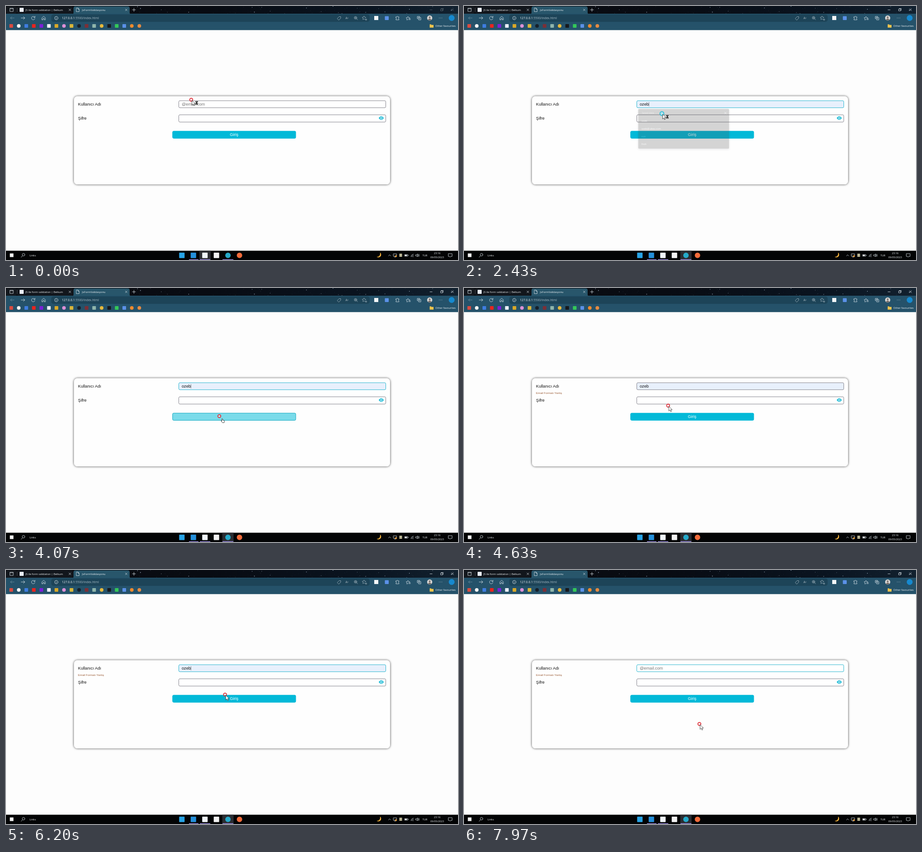
An HTML page for the animation above (8000 ms loop, 998 by 561 pixels).

```html
<!DOCTYPE html>
<html lang="tr">
<head>
<meta charset="utf-8">
<title>Form validation</title>
<style>
  html, body { margin: 0; width: 100%; height: 100%; overflow: hidden; background: #fdfdfd; }
  svg { display: block; width: 100vw; height: 100vh; }
  text { white-space: pre; }
  .ui { font: 5.87px "Open Sans", "Noto Sans", sans-serif; fill: #f2f5f7; }
  .form { font: 9.2px "Liberation Sans", Arial, sans-serif; fill: #111; }
  .line { fill: none; stroke: #dfe8ec; stroke-width: .8; stroke-linecap: round; stroke-linejoin: round; }
</style>
</head>
<body>
<svg viewBox="0 0 998 561" preserveAspectRatio="none">
  <defs>
    <linearGradient id="sky">
      <stop offset="0" stop-color="#0b0d12"/><stop offset=".45" stop-color="#080b12"/>
      <stop offset=".8" stop-color="#0a1420"/><stop offset="1" stop-color="#12212f"/>
    </linearGradient>
    <filter id="glow" x="-5%" y="-15%" width="110%" height="130%">
      <feDropShadow dx="0" dy="0" stdDeviation="2.6" flood-color="#000" flood-opacity=".75"/>
    </filter>
    <filter id="soft" x="-10%" y="-20%" width="120%" height="150%">
      <feDropShadow dx="0" dy="2" stdDeviation="3" flood-color="#223" flood-opacity=".4"/>
    </filter>
  </defs>

  <!-- tab strip -->
  <rect width="998" height="18" fill="url(#sky)"/>
  <g id="stars"></g>
  <rect x="1" y="1" width="22" height="16" rx="3" fill="#14181e"/>
  <path class="line" d="M9 5h7v7h-7z M9 6h7"/>
  <rect x="25" y="1" width="123" height="16" rx="4" fill="#12161c"/>
  <path class="line" stroke-opacity=".35" d="M24.500 4v9"/>
  <rect x="30" y="4" width="9" height="9" rx="1" fill="#e9eef8"/>
  <text class="ui" x="43" y="10.500">JS ile form validation | Belkum</text>
  <path d="M146 18q3 0 3-4V5q0-4 4-4H269q4 0 4 4V14q0 4 3 4z" fill="#28566b"/>
  <path class="line" d="M155.500 4.500h3.500l2.500 2.500v5.500h-6z M159 4.500v2.500h2.500"/>
  <text class="ui" x="168" y="10.500">JsFormValidasyonu</text>
  <path class="line" d="M139 6.500l4 4m0-4l-4 4 M263.500 6.500l4 4m0-4l-4 4 M279 8.500h7m-3.500-3.500v7"/>
  <path id="controls" class="line" d="M936 8.500h5 M960 6.800h4v4h-4z M961 6.500V5.500h4.200v4.200h-1 M983.500 6l4.500 4.500m0-4.500l-4.500 4.500"/>

  <!-- toolbar -->
  <rect y="17" width="998" height="36.500" fill="#25526a"/>
  <rect x="100" y="18.500" width="703" height="16.500" rx="5" fill="#1d4458"/>
  <path class="line" stroke-opacity=".4" d="M18 26.500h-8m3-3l-3 3 3 3"/>
  <path class="line" d="M33.500 26.500h8m-3-3l3 3-3 3
    M63.500 25a3.800 3.800 0 1 0 .3 2.700M64 22.500v2.800h-2.800
    M79.500 26l3.700-3.300 3.700 3.300v4.500h-2.400v-3h-2.600v3h-2.400z
    M111 26.500v2.200M111 24.600v.2"/>
  <circle class="line" cx="111" cy="26.700" r="3.700"/>
  <text class="ui" x="123.500" y="29" style="font-size:6.720px">127.0.0.1<tspan fill="#a9bcc6">:5500/index.html</tspan></text>
  <g opacity=".7">
    <path class="line" d="M731.500 27.500l4-4h3.500v3.500l-4 4z M770 28.500m4.300-.2l2 2 M770.300 26h3 M771.800 24.500v3"/>
    <circle class="line" cx="771.800" cy="26" r="2.900"/>
    <text class="ui" x="749.500" y="29" style="font-size:6.700px">A<tspan style="font-size:4.500px" dy="-1.500">»</tspan></text>
    <path class="line" d="M793 29.500l-2.500-1-2.500 1.500.4-3-2-2 2.900-.5 1.200-2.500 1.300 2.500 2.800.5-1 1.500 M795 28v4m-2-2h4"/>
  </g>
  <rect x="813" y="22" width="9" height="9" fill="#f3f6f8"/>
  <rect x="836.500" y="22.500" width="8.500" height="8.500" rx="1" fill="#5b91e8"/>
  <path class="line" d="M861 24h2a1.300 1.300 0 0 1 2.600 0h2v2a1.300 1.300 0 0 0 0 2.600v2h-6.600v-2a1.300 1.300 0 0 0 0-2.600z
    M887 30l-2 1 .4-3-2-2 2.900-.5 1.200-2.500 1.300 2.500 2.800.5-1 1 M889 28h4m-4 2h4
    M908.500 23h5v5h-5z M911 29.500v1.200h5v-5h-1.200 M911 24.300v2.400m-1.200-1.200h2.400"/>
  <circle cx="935.500" cy="26.500" r="5.700" fill="#d8d6d4"/>
  <circle cx="935.500" cy="25" r="2" fill="#77706c"/><path d="M931.500 30.500q4-6 8 0-4 3-8 0z" fill="#77706c"/>
  <path class="line" stroke-width="1.200" d="M956.500 26.500h.1M959.500 26.500h.1M962.500 26.500h.1"/>
  <circle cx="984" cy="26.500" r="6.500" fill="#1689cf"/>
  <g id="bookmarks"></g>
  <path d="M935.500 40.500h3l1 1.200h4.500v6h-8.500z" fill="#f1c54c"/>
  <text class="ui" x="948" y="46">Other favourites</text>

  <!-- page -->
  <rect y="53.500" width="998" height="487" fill="#fdfdfd"/>
  <rect x="150" y="199.500" width="698" height="194.500" rx="8" fill="#fefefe" filter="url(#glow)"/>
  <text class="form" x="159" y="220">Kullanıcı Adı</text>
  <text class="form" x="159" y="251">Şifre</text>
  <text id="error" class="form" x="159" y="234" style="font-size:6.250px;fill:#9a5a34">Email Formatı Yanlış</text>
  <rect id="user" x="381.500" y="209.200" width="457" height="15.500" rx="2.500" stroke-width=".9"/>
  <text id="value" class="form" x="388" y="220"></text>
  <path id="caret" d="M408.300 212.500v9" stroke="#222" stroke-width=".6"/>
  <rect x="381.500" y="240.300" width="457" height="16" rx="2.500" fill="#fff" stroke="#77757f" stroke-width=".9"/>
  <path d="M823 247.500q5.500-8 11 0-5.500 8-11 0z" fill="#07b4d2"/>
  <circle cx="828.500" cy="247.500" r="2.600" fill="#fff"/><circle cx="828.500" cy="247.500" r="1.600" fill="#07b4d2"/>
  <rect id="button" x="367.800" y="276.300" width="272" height="16" rx="2.500" stroke-width="1"/>
  <text id="login" class="form" x="503.700" y="287" text-anchor="middle" style="fill:#fff">Giriş</text>

  <g id="menu">
    <rect id="panel" x="381" y="226" width="208" rx="1.500" fill="#4a4a4a" stroke="#3c3c3c" stroke-width=".6" filter="url(#soft)"/>
    <text class="ui" x="389" y="237" style="font-size:5.400px;fill:#b9b9b9">Saved data</text>
    <path class="line" d="M578.800 232.800l4.400 4.400m0-4.400l-4.400 4.400"/>
    <g id="rows"></g>
  </g>

  <!-- taskbar -->
  <rect y="540.500" width="998" height="21" fill="#030405"/>
  <rect id="active" y="540.500" width="25" height="20.500" fill="#2b2c31"/>
  <path d="M404 560.300h21M478 560.300h24M428 560.300h23" stroke="#9a8be0" stroke-width="1.400"/>
  <rect x="8.500" y="546.500" width="8" height="8" fill="#f4f4f4"/>
  <path class="line" d="M36.500 551.500l-3 3.500"/><circle class="line" cx="38.700" cy="549.300" r="2.900"/>
  <text class="ui" x="52" y="552.800">Links</text>
  <g id="apps"></g>
  <path d="M826 544.500a6 6 0 1 1-7.500 9.500q8.500 0 7.500-9.500z" fill="#f5b23c"/>
  <path class="line" d="M844.500 552l2.500-2.500 2.500 2.500 M855.500 547.500h7v5h-7z M857 554.500h4
    M880.500 549h6.500v3.500h-6.500z M888 550v1.500 M894 553.500q1-4.500 5.500-5.500M896 553.800q.7-2.500 3.500-3.200M898.500 554l1-.5
    M905 549.500h1.500l2-2v6.500l-2-2H905z M910 549q1.200 1.700 0 3.500M911.500 548q2 2.700 0 5.500
    M977 547h8v6h-3l-1.500 1.800-1.500-1.800h-2z"/>
  <circle cx="861" cy="552.500" r="2" fill="#e89a32"/>
  <rect x="868.500" y="547" width="6" height="7" fill="#b9b594"/><path d="M881 549.500h4v2.500h-4z" fill="#eee"/>
  <text class="ui" x="919.500" y="552.800" style="font-size:5.700px">TUR</text>
  <g text-anchor="middle">
    <text class="ui" x="952" y="548" style="font-size:5.650px">23:16</text>
    <text class="ui" x="952" y="557" style="font-size:5.650px">09/05/2023</text>
  </g>

  <!-- pointer -->
  <g id="pointer">
    <circle id="ring"/>
    <path id="arrow" d="M1.500 1.500v10.500l2.500-2.300 1.700 3.800 1.700-.8-1.700-3.600h3.400z" fill="#fff" stroke="#111" stroke-width=".7"/>
    <g id="hourglass">
      <path d="M9 3h6v1.500l-2 2.500 2 2.500V11H9V9.500l2-2.500-2-2.500z" fill="#161616" stroke="#fff" stroke-width=".4"/>
      <path d="M10.500 4.500h3M11 9.500h2" stroke="#ddd" stroke-width=".7"/>
    </g>
    <path id="hand" d="M5.500 11V6q.9-1.200 1.800 0v2.800l3.200.7q1 .3.800 1.500l-.6 3.500H6.800l-3-4q.4-1 1.700.5z" fill="#fff" stroke="#111" stroke-width=".75"/>
    <path id="beam" d="M4.500 2.700h3M6 2.700v8.300M4.500 11h3" stroke="#222" stroke-width=".8" fill="none"/>
  </g>
</svg>
<script>
const $ = id => document.getElementById(id);
const set = (id, attrs) => { for (const k in attrs) $(id).setAttribute(k, attrs[k]); };
const show = (id, on) => $(id).style.display = on ? '' : 'none';
const clamp = v => Math.max(0, Math.min(1, v));
const CYAN = '#10aecb', LOOP = 8000;

// Static small parts
let seed = 11;
const random = () => (seed = seed * 16807 % 2147483647) / 2147483647;
$('stars').innerHTML = Array.from({ length: 130 }, () => {
  const x = 285 + random() * 710, y = random() * 17, r = .2 + random() ** 4 * .8;
  return `<circle cx="${x}" cy="${y}" r="${r}" fill="#b9cbe0" opacity="${.3 + random() * .6}"/>`;
}).join('');

const marks = ['#d94b40', 'o#f4f4f4', '#3e7de0', '#e8241f', '#7a20d8', '#e9eef8', '#d9a928', 'o#dc8fd6', '#d9b63a',
  'o#17212a', '#7a3038', '#8fb5ab', 'o#e6b93c', '#17191d', '#34c759', '#5b91e8', 'o#ef8a2d', 'o#e58b42'];
const apps = ['#27a3e6', '#2490dc', '#f0f5fa', '#f2f2f2', 'o#25a9c9', 'o#f26b3a'];
const badge = (color, x, y, r) => color[0] === 'o'
  ? `<circle cx="${x}" cy="${y}" r="${r}" fill="${color.slice(1)}"/>`
  : `<rect x="${x - r}" y="${y - r}" width="${2 * r}" height="${2 * r}" rx="1" fill="${color}"/>`;
$('bookmarks').innerHTML = marks.map((c, i) => badge(c, 11.5 + i * 16.64, 44, 4)).join('');
$('apps').innerHTML = apps.map((c, i) => badge(c, 388.3 + i * 25.45, 550.7, 6)).join('');
$('rows').innerHTML = ['ozeb', 'ozeb@ubez.com', 'vun', 'frolt'].map((s, i) =>
  `<text class="ui" x="388" y="${255 + i * 17.7}">${s}</text>`).join('');

// Pointer route: time, x, y
const route = [[0, 409, 207], [700, 409, 215], [1100, 409, 216], [1500, 408.5, 232.5], [1600, 408.5, 232.5],
  [2150, 437, 250], [2330, 437, 250], [2430, 437, 237.5], [2700, 437, 237.5], [3500, 471, 283], [4350, 471, 283],
  [5050, 413.7, 217.5], [5700, 413.7, 217.5], [6600, 533.3, 316], [7050, 533.3, 316], [7700, 519.7, 340], [LOOP, 519.7, 340]];
const clicks = [800, 2330, 4150, 5120];

function pointerAt(t) {
  const i = route.findIndex(p => p[0] > t), [t0, x0, y0] = route[i - 1], [t1, x1, y1] = route[i];
  const u = (t - t0) / (t1 - t0), e = u * u * (3 - 2 * u);
  return [x0 + (x1 - x0) * e, y0 + (y1 - y0) * e];
}

function draw(t) {
  const [x, y] = pointerAt(t);
  const windowActive = t >= 800;
  const focused = windowActive && t < 4150 || t >= 5120;
  const filled = t >= 2330 && t < 6600;
  const value = t < 2330 ? '' : t < 6600 ? 'ozeb' : t < 7250 ? 'oze' : t < 7400 ? 'oz' : t < 7550 ? 'o' : '';

  // Browser and field states
  set('controls', { opacity: windowActive ? 1 : .35 });
  set('active', { x: windowActive ? 477.5 : 427 });
  set('user', { fill: filled ? '#e8f0fc' : '#fff', stroke: focused ? CYAN : '#77757f' });
  $('value').textContent = value || '@email.com';
  $('value').style.fill = value ? '#111' : '#757575';
  show('caret', focused && value && Math.floor(t / 500) % 2 === 0);
  set('caret', { transform: `translate(${(value.length - 4) * 5} 0)` });
  show('error', t >= 4200);

  // Suggestion list
  const rows = t < 4000 ? 4 : 2;
  const fade = t < 4000 ? Math.min(clamp((t - 950) / 130), clamp((2460 - t) / 130))
    : Math.min(clamp((t - 6650) / 130), clamp((7680 - t) / 130));
  const height = 19.5 + 17.75 * rows, cy = 226 + height / 2, scale = .95 + .05 * fade;
  show('menu', fade > 0);
  set('menu', { opacity: fade, transform: `translate(485 ${cy}) scale(${scale}) translate(-485 ${-cy})` });
  set('panel', { height });
  [...$('rows').children].forEach((row, i) => row.style.display = i < rows ? '' : 'none');

  // Pointer and hover
  const busy = t < 2700;
  const overButton = !busy && x > 367 && x < 640 && y > 276 && y < 292.5;
  const overField = !busy && x > 381 && x < 838 && (y > 209 && y < 225 || y > 240 && y < 256.5);
  set('button', { fill: overButton ? '#7adbea' : '#02b9d8', stroke: overButton ? '#12a9c0' : '#02b9d8' });
  show('login', !overButton);
  show('hand', overButton);
  show('beam', overField);
  show('arrow', !overButton && !overField);
  show('hourglass', busy);
  set('pointer', { transform: `translate(${x} ${y})` });
  const pressed = clicks.some(c => t >= c && t < c + 180);
  set('ring', pressed
    ? { r: 4.3, fill: '#b4e3ee', stroke: '#35bfd8', 'stroke-width': 2 }
    : { r: 3.3, fill: 'rgba(255,255,255,.35)', stroke: '#e0323c', 'stroke-width': 1.8 });
}

const start = performance.now();
function tick() {
  draw((performance.now() - start) % LOOP);
  requestAnimationFrame(tick);
}
tick();
</script>
</body>
</html>
```
